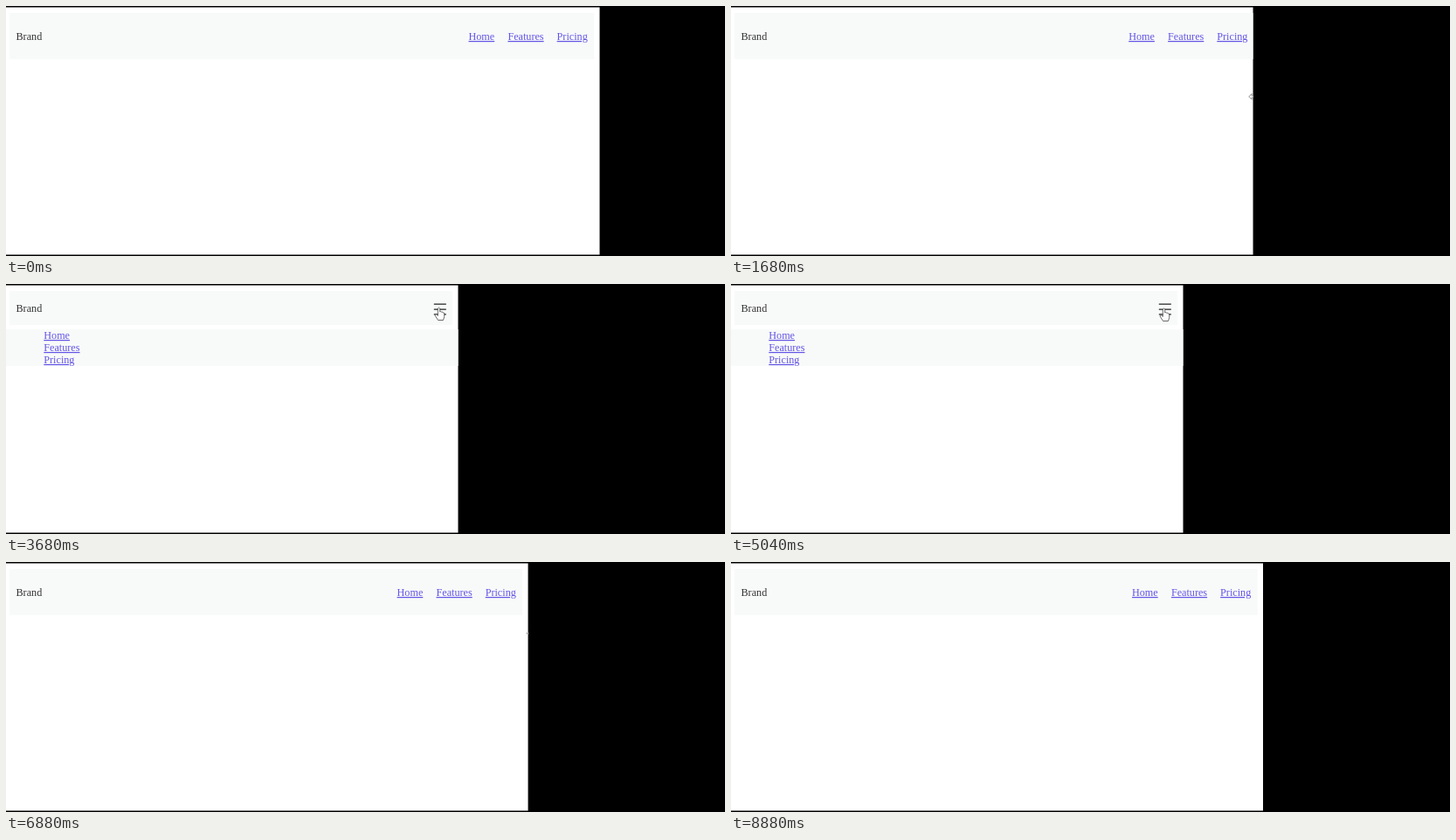
These frames come from a looping animation (823x287 px, 8960 ms). An HTML page:

```html
<!DOCTYPE html>
<html lang="en">
<head>
<meta charset="utf-8">
<title>Responsive navbar</title>
<style>
  html, body { margin: 0; width: 100%; height: 100%; overflow: hidden; background: #000; }
  svg { display: block; width: 823px; height: 287px; }
  text { font: 12.16px "Liberation Serif", "Times New Roman", serif; fill: #333; }
  .link { fill: #6354e6; text-decoration: underline; }
  .bar { fill: #f8faf9; }
  #cursor path { fill: #fff; stroke: #444; stroke-width: .8; stroke-linejoin: round; }
  #cursor #resize { stroke: #777; }
</style>
</head>
<body>
<svg viewBox="0 0 823 287">
  <defs><clipPath id="clip"><rect id="view" y="1.5" height="284"/></clipPath></defs>
  <rect width="823" height="287"/>
  <g clip-path="url(#clip)">
    <rect width="823" height="287" fill="#fff"/>
    <rect id="nav" class="bar" x="4" y="8"/>
    <text id="brand" x="11.5">Brand</text>
    <g id="links">
      <text class="link" x="-143.8" y="39">Home</text>
      <text class="link" x="-98.9" y="39">Features</text>
      <text class="link" x="-42.7" y="39">Pricing</text>
    </g>
    <path id="burger" d="M-21.5 23.2h14m-14 5.8h14m-14 5.8h14" stroke="#222" stroke-width="1.25"/>
    <g id="menu">
      <rect class="bar" y="52" width="823" height="42"/>
      <text class="link" x="43.3" y="63">Home</text>
      <text class="link" x="43.3" y="77">Features</text>
      <text class="link" x="43.3" y="91">Pricing</text>
    </g>
    <g id="cursor">
      <path id="resize" d="M-6.8 0L-3.5 -3.3V-1H3.5V-3.3L6.8 0L3.5 3.3V1H-3.5V3.3Z"/>
      <path id="arrow" d="M0 0V10.5L2.5 8.2L4.2 12L5.8 11.3L4.2 7.6H7.4Z"/>
      <path id="hand" d="M-1.2 1Q0 -1 1.2 1V5Q2.2 4 3.2 5.2Q4.4 4.6 5 6Q6 5.6 6.2 7V10.5L5 14.5H-1L-4.3 9.2Q-4.6 7.4 -3 7.8L-1.2 9.4Z"/>
    </g>
  </g>
</svg>
<script>
  const LOOP = 8960, STEP = 80, BREAKPOINT = 582;

  const $ = id => document.getElementById(id);
  const show = (id, on) => { $(id).style.display = on ? '' : 'none'; };
  const shift = (id, x, y = 0) => $(id).setAttribute('transform', `translate(${x} ${y})`);

  const ramp = (t, from, span) => Math.min(1, Math.max(0, (t - from) / span));
  const easeOut = u => 1 - (1 - u) ** 3;
  // smooth 0 to 1 between from and from + span
  const glide = (t, from, span) => {
    const u = ramp(t, from, span);
    return u * u * (3 - 2 * u);
  };

  // right edge of the window: dragged in, later dragged out
  const edgeAt = t => 680 - 162 * glide(t, 1040, 1270) + 91.5 * easeOut(ramp(t, 6480, 800));

  // the layout trails the window while it shrinks
  const navAt = t => Math.max(edgeAt(t), edgeAt(t - STEP / 2)) - 6.7;

  // pointer, x counted from the window edge
  const pointerX = t => 12 - 10.5 * glide(t, 640, 320) - 24 * glide(t, 2800, 480)
    + 24 * glide(t, 5280, 320) + 10 * glide(t, 6640, 640);
  const pointerY = t => 104 - 77 * glide(t, 2800, 480) + 34 * glide(t, 4240, 320)
    - 33 * glide(t, 4720, 320) + 55 * glide(t, 5280, 320)
    - 6 * glide(t, 5760, 560) + 5 * glide(t, 6480, 400);

  function draw(now) {
    const t = Math.floor(now % LOOP / STEP) * STEP;
    const edge = edgeAt(t), nav = navAt(t);
    const dx = pointerX(t), y = pointerY(t);
    const small = edge < BREAKPOINT;

    $('view').setAttribute('width', edge - .5);
    $('nav').setAttribute('width', nav - 4);
    $('nav').setAttribute('height', small ? 39 : 53);
    $('brand').setAttribute('y', small ? 32 : 39);
    shift('links', nav);
    shift('burger', nav);
    show('links', !small);
    show('burger', small);
    show('menu', t >= 3440 && t < 5200);

    const kind = dx > -5 ? 'resize' : y < 40 ? 'hand' : 'arrow';
    for (const id of ['resize', 'arrow', 'hand']) show(id, id === kind);
    shift('cursor', edge + dx, y);
  }

  const start = performance.now();
  function tick() {
    draw(performance.now() - start);
    requestAnimationFrame(tick);
  }
  tick();
</script>
</body>
</html>
```
